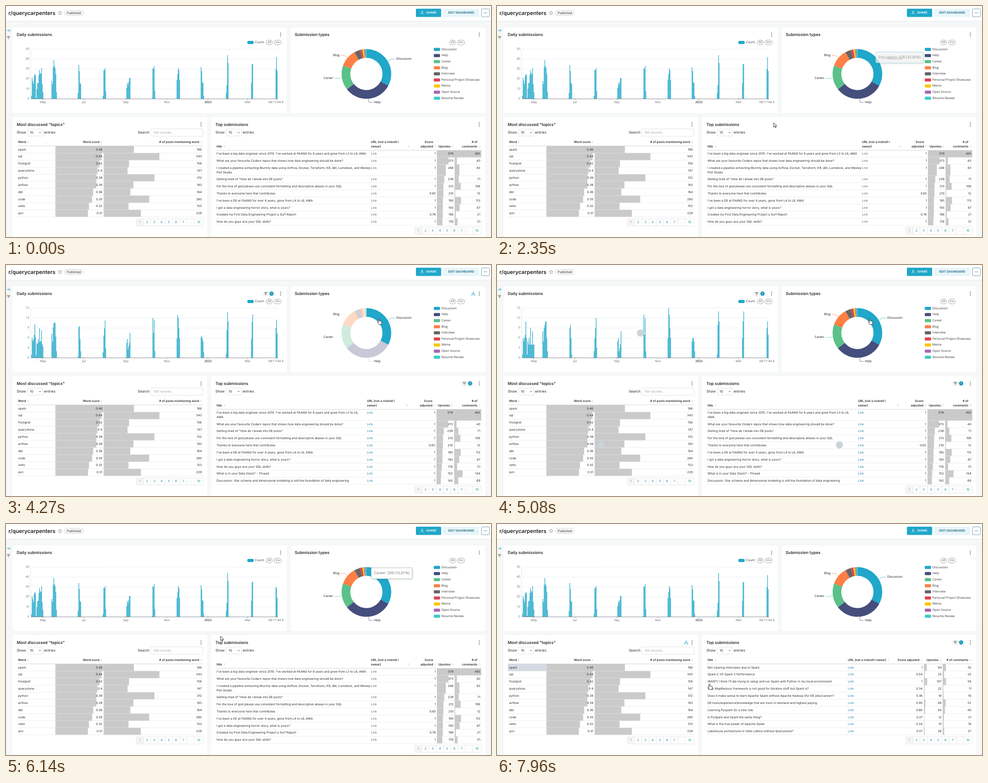
These frames come from a looping animation (1085 px wide and 516 px high, 7990 ms). An HTML page with a canvas:

```html
<!DOCTYPE html>
<html lang="en">
<head>
<meta charset="utf-8">
<title>Dashboard</title>
<style>
html, body { margin: 0; width: 100%; height: 100%; overflow: hidden; background: #f6f8f8; }
canvas { display: block; width: 1085px; height: 516px; }
</style>
</head>
<body>
<canvas id="stage"></canvas>
<script>
const W = 1085, H = 516, LOOP = 7990;
const canvas = document.getElementById('stage');
const ctx = canvas.getContext('2d');
const dpr = window.devicePixelRatio || 1;
canvas.width = W * dpr;
canvas.height = H * dpr;

const UI = 'Inter, sans-serif', CHART = '"Open Sans", "Noto Sans", sans-serif';
const TEAL = '#20a7c9', LINK = '#1985a0', INK = '#2b2b2b', BAR = '#cacaca', RULE = '#e3e5e5';
const SMALL = 6.78, BASE = 7.91;

// Timing helpers
const ramp = (t, a, b) => Math.min(1, Math.max(0, (t - a) / (b - a)));
const ease = p => p * p * (3 - 2 * p);
const mix = (a, b, p) => a + (b - a) * p;
const within = (t, a, b) => t >= a && t < b;

function track(keys, t) {
  if (t <= keys[0][0]) return keys[0].slice(1);
  for (let i = 1; i < keys.length; i++) {
    const a = keys[i - 1], b = keys[i];
    if (t <= b[0]) {
      const p = ease(ramp(t, a[0], b[0]));
      return a.slice(1).map((v, k) => mix(v, b[k + 1], p));
    }
  }
  return keys[keys.length - 1].slice(1);
}

// Drawing helpers
function text(s, x, y, { size = SMALL, weight = 400, color = INK, align = 'left', font = UI } = {}) {
  ctx.font = `${weight} ${size}px ${font}`;
  ctx.fillStyle = color;
  ctx.textAlign = align;
  ctx.fillText(s, x, y);
}

function rect(x, y, w, h, color) {
  ctx.fillStyle = color;
  ctx.fillRect(x, y, w, h);
}

function box(x, y, w, h, r, fill, stroke, width = 0.7) {
  ctx.beginPath();
  ctx.roundRect(x, y, w, h, r);
  if (fill) { ctx.fillStyle = fill; ctx.fill(); }
  if (stroke) { ctx.strokeStyle = stroke; ctx.lineWidth = width; ctx.stroke(); }
}

function line(points, color, width = 0.7) {
  ctx.beginPath();
  points.forEach(([x, y], i) => i ? ctx.lineTo(x, y) : ctx.moveTo(x, y));
  ctx.strokeStyle = color;
  ctx.lineWidth = width;
  ctx.stroke();
}

function poly(points, color) {
  ctx.beginPath();
  points.forEach(([x, y]) => ctx.lineTo(x, y));
  ctx.fillStyle = color;
  ctx.fill();
}

function dot(x, y, r, color) {
  ctx.beginPath();
  ctx.arc(x, y, r, 0, Math.PI * 2);
  ctx.fillStyle = color;
  ctx.fill();
}

function menuDots(x, y) {
  for (const d of [-3.6, 0, 3.6]) dot(x, y + d, 1, '#5c5c5c');
}

function sortMark(x, y) {
  poly([[x - 1.6, y - 0.6], [x + 1.6, y - 0.6], [x, y - 2.6]], '#cfcfcf');
  poly([[x - 1.6, y + 0.6], [x + 1.6, y + 0.6], [x, y + 2.6]], '#cfcfcf');
}

function filterMark(x, y, color) {
  [3.6, 2.3, 1].forEach((w, i) => line([[x - w, y - 2.4 + i * 2.4], [x + w, y - 2.4 + i * 2.4]], color, 1));
}

function badge(x, y) {
  box(x - 21, y - 6, 30, 12.5, 6, '#f5f6f6');
  filterMark(x - 13, y, '#444');
  dot(x, y, 4.7, '#1a9abb');
  text('1', x, y, { size: 6, color: '#fff', align: 'center' });
}

function crossMark(x, y) {
  line([[x - 2.7, y + 2.3], [x - 2.7, y + 0.2], [x + 2.7, y + 0.2], [x + 2.7, y + 2.3]], TEAL, 0.8);
  line([[x, y - 2], [x, y + 0.2]], TEAL, 0.8);
  for (const [dx, dy] of [[0, -2.5], [-2.7, 2.6], [2.7, 2.6]]) box(x + dx - 1.2, y + dy - 1.2, 2.4, 2.4, 0.3, '#fff', TEAL);
}

function pills(x, y) {
  for (const [s, dx, w] of [['All', 0, 14], ['Inv', 17.8, 16]]) {
    box(x + dx, y - 5.3, w, 10.6, 5.3, '#fff', '#777');
    text(s, x + dx + w / 2, y, { color: '#555', align: 'center', font: CHART });
  }
}

// Page frame
const panels = [[15, 48, 613, 191], [637, 48, 435, 191], [15, 248, 435, 270], [459, 248, 613, 270]];

function drawFrame() {
  rect(0, 0, W, H, '#f6f8f8');
  rect(0, 0, W, 33.5, '#fff');
  rect(0, 33.5, W, 1, '#e4e7e7');
  for (const [x, y, w, h] of panels) box(x, y, w, h, 1.5, '#fff');

  text('r/querycarpenters', 5.5, 16, { size: 11.9, weight: 600, color: '#222' });
  const star = [];
  for (let i = 0; i < 11; i++) {
    const r = i % 2 ? 2 : 4.5, a = i * Math.PI / 5;
    star.push([121 + r * Math.sin(a), 15.7 - r * Math.cos(a)]);
  }
  line(star, '#777');
  box(130.3, 9.5, 43, 12, 6, '#f3f3f3', '#d4d4d4');
  text('Published', 151.8, 15.6, { align: 'center', color: '#333' });

  box(917, 6, 56.5, 18.5, 2, TEAL);
  ctx.strokeStyle = '#fff';
  ctx.lineWidth = 0.8;
  ctx.beginPath();
  ctx.arc(931, 13.2, 1.6, 0, 7);
  ctx.stroke();
  line([[928.2, 18.5], [929, 16.2], [931.3, 15.6], [933, 17], [934.2, 18.6]], '#fff', 0.8);
  text('SHARE', 940, 15.4, { weight: 600, color: '#fff' });
  box(978, 6, 80.5, 18.5, 2, '#e8f5f9');
  text('EDIT DASHBOARD', 1018.3, 15.4, { weight: 600, color: '#1a6780', align: 'center', size: 6.6 });
  box(1063.5, 6.5, 18, 17.5, 2, '#fff', '#5c93a8', 0.9);
  for (const d of [-2.6, 0, 2.6]) dot(1072.5 + d, 15.3, 0.8, '#245a70');

  line([[2, 54.7], [7, 54.7]], TEAL, 0.9);
  line([[5, 52.7], [7.2, 54.7], [5, 56.7]], TEAL, 0.9);
  line([[8.6, 51.8], [8.6, 57.6]], TEAL, 0.9);
  filterMark(5.7, 70.5, '#444');

  const heads = [['Daily submissions', 24, 64.5], ['Submission types', 646, 64.5],
    ['Most discussed "topics"', 24, 265], ['Top submissions', 468.5, 265]];
  for (const [s, x, y] of heads) text(s, x, y, { size: 9.04, weight: 600, color: '#2a2a2a' });
  for (const [x, y] of [[614.3, 64], [1058.8, 64], [436.4, 264.7], [1058.8, 264.7]]) menuDots(x, y);
}

// Daily bars: first x, heights for everything, heights for the filtered view
const DAY = 1.51, FLOOR = 207.5;
const clusters = [
  [57, [3, 21, 18, 15, 23, 25, 24, 1, 10, 16, 16, 24, 29, 26, 25, 31, 15, 7],
       [1, 6, 5, 6, 7, 11, 6, 1, 5, 4, 6, 4, 9, 4, 4, 8, 4, 4]],
  [102.5, [18, 15, 32, 39, 33, 31, 25, 7], [8, 5, 9, 10, 11, 11, 6, 2]],
  [161.3, [6, 34, 28, 16, 15], [0, 9, 10, 6, 1]],
  [217.2, [3, 29, 29, 31, 8], [2, 6, 9, 12, 3]],
  [270, [11, 16, 14, 17, 21, 21], [5, 6, 2, 3, 4, 8]],
  [327, [1, 31, 30, 33, 8], [0, 13, 7, 12, 2]],
  [382.5, [19, 25, 31, 29, 19], [6, 15, 13, 9, 6]],
  [436.4, [32, 28, 17, 16, 3], [5, 6, 6, 5, 2]],
  [492.6, [6, 14, 44, 36], [1, 10, 14, 11]],
  [549, [16, 35, 35], [6, 11, 14]],
  [603.8, [30, 42, 28], [9, 11, 7]]
];

function drawDaily(t) {
  const filtered = within(t, 4020, 5350);
  const part = ease(ramp(t, 4020, 4400)) - ease(ramp(t, 5350, 5630));
  const latest = t < 5350 ? 1 : mix(0.69, 1, ramp(t, 6460, 6560));

  box(540, 78, 14, 7, 2, TEAL);
  text('Count', 557, 81.5, { color: '#333', font: CHART, size: 7 });
  pills(582, 81.5);
  for (let i = 0; i <= 5; i++) {
    const y = FLOOR - i * 22.24;
    if (i) line([[56, y], [607.5, y]], '#e3e8f1');
    text(i * (filtered ? 3 : 10), 52, y - 0.4, { color: '#6e7079', align: 'right', font: CHART, size: 7 });
  }
  for (let i = 1; i < 25; i++) {
    if (i % 5) line([[54, FLOOR - i * 4.45], [56, FLOOR - i * 4.45]], '#8d9098', 0.6);
  }
  clusters.forEach(([x, all, some], c) => all.forEach((v, i) => {
    const k = c === clusters.length - 1 && i ? latest : 1;
    const h = mix(v * 2.224 * k, some[i] * 7.413, part);
    rect(x + i * DAY - 0.65, FLOOR - h, 1.25, h, TEAL);
  }));
  line([[56, FLOOR], [607.5, FLOOR]], '#6e7079', 0.8);
  const months = [['May', 82.5], ['Jul', 174.3], ['Sep', 268], ['Nov', 360], ['2023', 451.8], ['Mar', 540.5]];
  for (const [s, x] of months) {
    line([[x, FLOOR], [x, FLOOR + 2.8]], '#6e7079');
    text(s, x, 215, { color: '#5f6169', align: 'center', font: CHART, size: 7, weight: s === '2023' ? 700 : 400 });
  }
  line([[607, FLOOR], [607, FLOOR + 2.8]], '#6e7079');
  text('08:17:44 4', 587, 215, { color: '#5f6169', font: CHART, size: 7 });
  if (filtered) badge(594, 64);
}

// Submission types
const PIE = { x: 806.3, y: 151.8, inner: 36, outer: 55.5 };
const slices = [
  ['Discussion', 32.8, '#20a7c9'], ['Help', 31.6, '#454e7c'], ['Career', 16.01, '#5ac189'],
  ['Blog', 11.6, '#ff7f44'], ['Interview', 3.8, '#666666'], ['Personal Project Showcase', 1.5, '#e04355'],
  ['Meme', 1.2, '#fcc700'], ['Open Source', 0.7, '#a868b7'], ['Resume Review', 0.79, '#3ccccb']
];
const leaders = [
  [[854, 123.3], [862, 118.5], [870, 118.5]], [[811.3, 207], [812, 215.3], [820, 215.3]],
  [[751.5, 160.6], [743, 161.8], [734.5, 161.8]], [[764, 115.7], [757, 110.4], [748.5, 110.4]]
];

function drawPie(t) {
  const lift = ramp(t, 1440, 1500) - ramp(t, 1840, 1920) + ramp(t, 2860, 2960) - ramp(t, 3480, 3540);
  const fade = mix(1, 0.3, ramp(t, 3480, 3600) - ramp(t, 4860, 4960));
  let turn = -Math.PI / 2;
  slices.forEach(([name, share, color], i) => {
    const end = turn + share / 100 * Math.PI * 2;
    const up = i === 0 ? lift : 0;
    ctx.globalAlpha = i ? fade : 1;
    ctx.beginPath();
    ctx.arc(PIE.x, PIE.y, PIE.outer + 3 * up, turn, end);
    ctx.arc(PIE.x, PIE.y, PIE.inner, end, turn, true);
    ctx.fillStyle = up > 0.5 ? '#23b8dd' : color;
    ctx.fill();
    turn = end;
    if (leaders[i]) {
      const left = i > 1, [x, y] = leaders[i][2];
      line(leaders[i], color);
      ctx.globalAlpha = 1;
      text(name, x + (left ? -2.5 : 3), y - 0.1,
        { font: CHART, size: 6.9, color: '#111', align: left ? 'right' : 'left', weight: up > 0.5 ? 700 : 400 });
    }
    ctx.globalAlpha = 1;
    const y = 97 + i * 13.64;
    box(957, y - 3.5, 14, 7, 2, up > 0.5 ? '#23b8dd' : color);
    text(name, 974, y - 0.2, { font: CHART, size: 6.9, color: '#333' });
  });
  pills(992, 81.5);
  if (within(t, 3500, 4860)) crossMark(1045.3, 64);
}

// Tables
const ROW = 15.85;

function showEntries(x) {
  text('Show', x, 282.3, { size: BASE });
  box(x + 24, 275, 34.5, 15.5, 2, '#fff', '#d3d3d3');
  text('10', x + 29.5, 282.8, { size: 7.3 });
  line([[x + 50, 281.5], [x + 52, 283.6], [x + 54, 281.5]], '#333', 1);
  text('entries', x + 61, 282.3, { size: BASE });
}

function pager(x, y) {
  const labels = ['1', '2', '3', '4', '5', '6', '7', '...', '10'];
  box(x, y - 8, 149.5, 16, 2, '#fff', '#dcdcdc');
  rect(x + 0.4, y - 7.6, 15.8, 15.2, '#f5f5f5');
  labels.forEach((s, i) => {
    const left = x + i * 16.2, w = i === 8 ? 20 : 16.2;
    if (i) line([[left, y - 8], [left, y + 8]], '#dcdcdc');
    text(s, left + w / 2, y, { align: 'center', size: 7, color: i && i !== 7 ? LINK : '#8a8a8a' });
  });
}

function header(s, x, y, align, mark) {
  s.split('\n').reverse().forEach((part, i) => text(part, x, y - i * 9.6, { weight: 600, align, color: '#2a2a2a' }));
  sortMark(mark, y);
}

const words = [['spark', 0.46, 186], ['sql', 0.44, 343], ['frostgrid', 0.42, 156], ['querystone', 0.4, 147],
  ['python', 0.39, 312], ['airflow', 0.39, 183], ['dbt', 0.36, 164], ['code', 0.35, 280], ['velto', 0.32, 153], ['qvn', 0.31, 229]];

function drawWords(t) {
  const picked = t >= 6820;
  showEntries(24);
  text('Search', 321, 282.3, { size: BASE, align: 'right' });
  box(323.3, 274.5, 117.5, 16.5, 2, '#fff', '#d6d6d6');
  text('100 records...', 330, 282.8, { size: 7, color: '#a3a3a3' });
  header('Word', 27, 304, 'left', 49);
  header('Word score', 209.5, 304, 'right', 213.5);
  header('# of posts mentioning word', 432, 304, 'right', 436.5);
  words.forEach(([word, score, posts], i) => {
    const top = 312.7 + i * ROW, y = top + 7.9;
    if (picked && !i) rect(24, top, 86.5, ROW, '#d5dae4');
    rect(110.5, top, 108 * score / 0.46, ROW, BAR);
    rect(218.5, top, posts * 0.3636, ROW, BAR);
    rect(24, top + ROW - 0.6, 417, 0.7, RULE);
    text(word, 27, y);
    text(score, 215.5, y, { align: 'right' });
    text(posts, 438, y, { align: 'right' });
  });
  rect(24, 312.2, 417, 0.8, '#c8cccc');
  pager(291.4, 483.3);
  if (picked) crossMark(423.3, 264.7);
}

const veteran = "I've been a big data engineer since 2015. I've worked at FAANG for 6 years and grew from L3 to L6,";
const shared = {
  repos: ['What are your favourite Codarn repos that shows how data engineering should be done?', 1, 373, 40],
  tired: ['Getting tired of "How do I break into DE posts"', 1, 239, 71],
  love: ['For the love of god please use consistent formatting and descriptive aliases in your SQL', 1, 213, 106],
  thanks: ['Thanks to everyone here that contributes', 0.65, 210, 12],
  four: ["I've been a DE at FAANG for over 4 years, gone from L4 to L6, AMA", 1, 195, 113],
  horror: ['I got a data engineering horror story, what is yours?', 1, 193, 87],
  skills: ['How do you guys ace your SQL skills?', 1, 176, 51]
};
const { repos, tired, love, thanks, four, horror, skills } = shared;
const views = {
  all: {
    top: 322.4, url: 816.5, adj: 961.5, up: 964, upW: 40, upR: 1001, com: 1003.6, comW: 59.6, link: '#56697a', pageY: 502,
    heads: [['URL (not a rickroll I\nswear)', 816.5, 'left', 900.5], ['Score\nadjusted', 955.5, 'right', 960],
      ['Upvotes', 994.5, 'right', 999], ['# of\ncomments', 1054.5, 'right', 1060]],
    rows: [[veteran + ' AMA', 1, 579, 465], repos,
      ['I created a pipeline extracting Murmly data using Airflow, Docker, Terraform, K9, dbt, Lumidock, and Wexley\nPlot Studio', 1, 288, 83],
      tired, love, thanks, four, horror, ['Created my First Data Engineering Project a Surf Report', 0.76, 188, 21], skills]
  },
  discussion: {
    top: 322.4, url: 807.5, adj: 960, up: 963, upW: 40, upR: 999.5, com: 1002.6, comW: 60.6, link: LINK, pageY: 502,
    heads: [['URL (not a rickroll I\nswear)', 807.5, 'left', 897], ['Score\nadjusted', 954, 'right', 958.5],
      ['Upvotes', 993, 'right', 997.5], ['# of\ncomments', 1054.5, 'right', 1060]],
    rows: [[veteran + '\nAMA', 1, 579, 465], repos, tired, love, thanks, four, horror, skills,
      ['What is in your Data Stack? - Thread', 1, 152, 144],
      ['Discussion: Star schema and dimensional modeling is still the foundation of data engineering', 1, 142, 69]]
  },
  spark: {
    top: 312.7, url: 785, adj: 952, up: 955, upW: 40, upR: 994.5, com: 997, comW: 61, link: LINK, pageY: 483.3,
    heads: [['URL (not a rickroll I swear)', 785, 'left', 876], ['Score adjusted', 945, 'right', 949.5],
      ['Upvotes', 988, 'right', 992.5], ['# of comments', 1054.5, 'right', 1060]],
    rows: [['Not clearing interviews due to Spark', 1, 94, 55], ['Spark 2 VS Spark 3 Performance', 0.54, 25, 25],
      ["(RANT) I think I'll die trying to setup and run Spark with Python in my local environment", 1, 107, 59],
      ['Why MapReduce framework is not good for iterative stuff but Spark is?', 0.34, 22, 11],
      ['Does it make sense to learn Apache Spark without Apache Hadoop (for DE jobs/career)?', 0.36, 18, 16],
      ['DE tools/experience/knowledge that are most in-demand and highest paying', 0.95, 49, 52],
      ['Learning Pyspark for a new role', 0.86, 40, 40], ['Is PySpark and Spark the same thing?', 0.37, 12, 21],
      ['What is the true power of Apache Spark', 0.34, 15, 16],
      ['Lakehouse architecture in Velto Lattice without Querystone?', 0.57, 26, 27]]
  }
};

function drawSubmissions(t) {
  const filtered = within(t, 4020, 5350), spark = t >= 7380;
  const v = spark ? views.spark : filtered ? views.discussion : views.all;
  showEntries(468.5);
  const headY = v.top - 8.8;
  header('title', 471, headY, 'left', 489);
  for (const [s, x, align, mark] of v.heads) header(s, x, headY, align, mark);
  let top = v.top;
  for (const [title, adjusted, votes, comments] of v.rows) {
    const lines = title.split('\n'), h = ROW + (lines.length - 1) * 9.35, y = top + 7.9;
    rect(v.up, top, v.upW * votes / 579, h, BAR);
    rect(v.com, top, v.comW * comments / 465, h, BAR);
    rect(469, top + h - 0.6, 595, 0.7, RULE);
    lines.forEach((s, i) => text(s, 471, y + i * 9.5));
    text('Link', v.url, y, { color: v.link });
    text(adjusted, v.adj, y, { align: 'right' });
    text(votes, v.upR, y, { align: 'right' });
    text(comments, 1061, y, { align: 'right' });
    top += h;
  }
  rect(469, v.top - 0.5, 595, 0.8, '#c8cccc');
  pager(914, v.pageY);
  if (filtered || spark) badge(1038.3, 264.5);
}

function drawLoaders(t) {
  const fromPie = within(t, 3540, 4020) || within(t, 4900, 5350);
  const fromWord = within(t, 6840, 7380);
  const spots = fromPie ? [[321, 152], [233, 402], [766, 402]] : fromWord ? [[321, 152], [855, 152], [766, 402]] : [];
  for (const [x, y] of spots) dot(x, y, 8, '#ccd4d8');
}

// Tooltip keys: time, x, y, opacity
const tipKeys = [
  [1440, 800, 132, 0], [1510, 815, 118, 0.72], [1560, 815, 118, 0.72], [1700, 847, 103, 1], [1780, 855, 108, 1],
  [1880, 847, 103, 1], [2260, 847, 103, 1], [2350, 847, 103, 0.68], [2380, 847, 103, 0.6], [2480, 847, 103, 0],
  [2850, 852, 100, 0], [2980, 850, 98, 1], [3160, 839.5, 89.5, 1], [3460, 839.5, 89.5, 1], [3640, 839.5, 89.5, 0],
  [5670, 839.5, 89.5, 0], [5800, 839.5, 89.5, 1], [6070, 839.5, 89.5, 1], [6140, 817, 98, 1],
  [6320, 768, 128, 1], [6440, 766, 130, 0]
];

function drawTip(t) {
  const [x, y, alpha] = track(tipKeys, t);
  if (alpha <= 0) return;
  const career = within(t, 6080, 7000);
  const label = career ? 'Career: 209 (16.01%)' : 'Discussion: 428 (32.80%)';
  const style = { size: 8.25, font: CHART, color: '#666' };
  ctx.save();
  ctx.globalAlpha = alpha;
  ctx.font = `400 ${style.size}px ${CHART}`;
  const w = ctx.measureText(label).width + 12.5;
  ctx.shadowColor = 'rgba(0,0,0,.2)';
  ctx.shadowBlur = 5 * dpr;
  ctx.shadowOffsetX = ctx.shadowOffsetY = dpr;
  box(x, y, w, 24.3, 2.3, '#fff');
  ctx.shadowColor = 'transparent';
  box(x, y, w, 24.3, 2.3, null, career ? '#9ec2ae' : '#62b4c9', 0.8);
  text(label, x + 6.3, y + 12, style);
  ctx.restore();
}

// Pointer keys: time, x, y
const pointerKeys = [
  [760, 478, 520], [1000, 590, 425], [1250, 755, 275], [1400, 803, 202], [1510, 839, 132], [1560, 839, 132],
  [1720, 850, 138], [1860, 842, 133], [2000, 740, 205], [2220, 583, 275], [2350, 619, 261], [2380, 619, 261],
  [2900, 846, 130], [3160, 834, 120], [5670, 834, 120], [6020, 828, 124], [6080, 770, 155], [6140, 480, 251],
  [6300, 140, 330], [6450, 9, 350], [6480, 16, 323], [6560, 42, 319], [7650, 42, 319], [7960, 475, 357]
];
const arrow = new Path2D('M0 0V9.6L2.3 7.5 3.9 11 5.5 10.3 3.9 6.9H7Z');
const hand = new Path2D('M-.9 1Q.3-.8 1.4 1V5Q2.5 4.3 3.3 5.3 4.4 4.8 5 5.8 6.5 5.4 6.7 7 7 10.4 5.6 12.8H.3Q-1.4 10.4-3 8.2-2.9 6.4-.9 7.6Z');

function drawPointer(t) {
  if (t < 760) return;
  const [x, y] = track(pointerKeys, t);
  const reach = Math.hypot(x - PIE.x, y - PIE.y);
  const overSlice = reach > PIE.inner && reach < 59;
  const overCell = y > 312 && ((x > 469 && x < 814) || (x > 24 && x < 110));
  const shape = overSlice || overCell ? hand : arrow;
  ctx.save();
  ctx.translate(x, y);
  ctx.fillStyle = '#fff';
  ctx.strokeStyle = '#111';
  ctx.lineWidth = 0.9;
  ctx.lineJoin = 'round';
  ctx.fill(shape);
  ctx.stroke(shape);
  ctx.restore();
}

function draw(now) {
  const t = now % LOOP;
  ctx.setTransform(dpr, 0, 0, dpr, 0, 0);
  ctx.textBaseline = 'middle';
  ctx.textRendering = 'geometricPrecision';
  for (const layer of [drawFrame, drawDaily, drawPie, drawWords, drawSubmissions, drawLoaders, drawTip, drawPointer]) layer(t);
}

let start;
function tick(now) {
  start ??= now;
  draw(now - start);
  requestAnimationFrame(tick);
}
requestAnimationFrame(tick);
</script>
</body>
</html>
```
